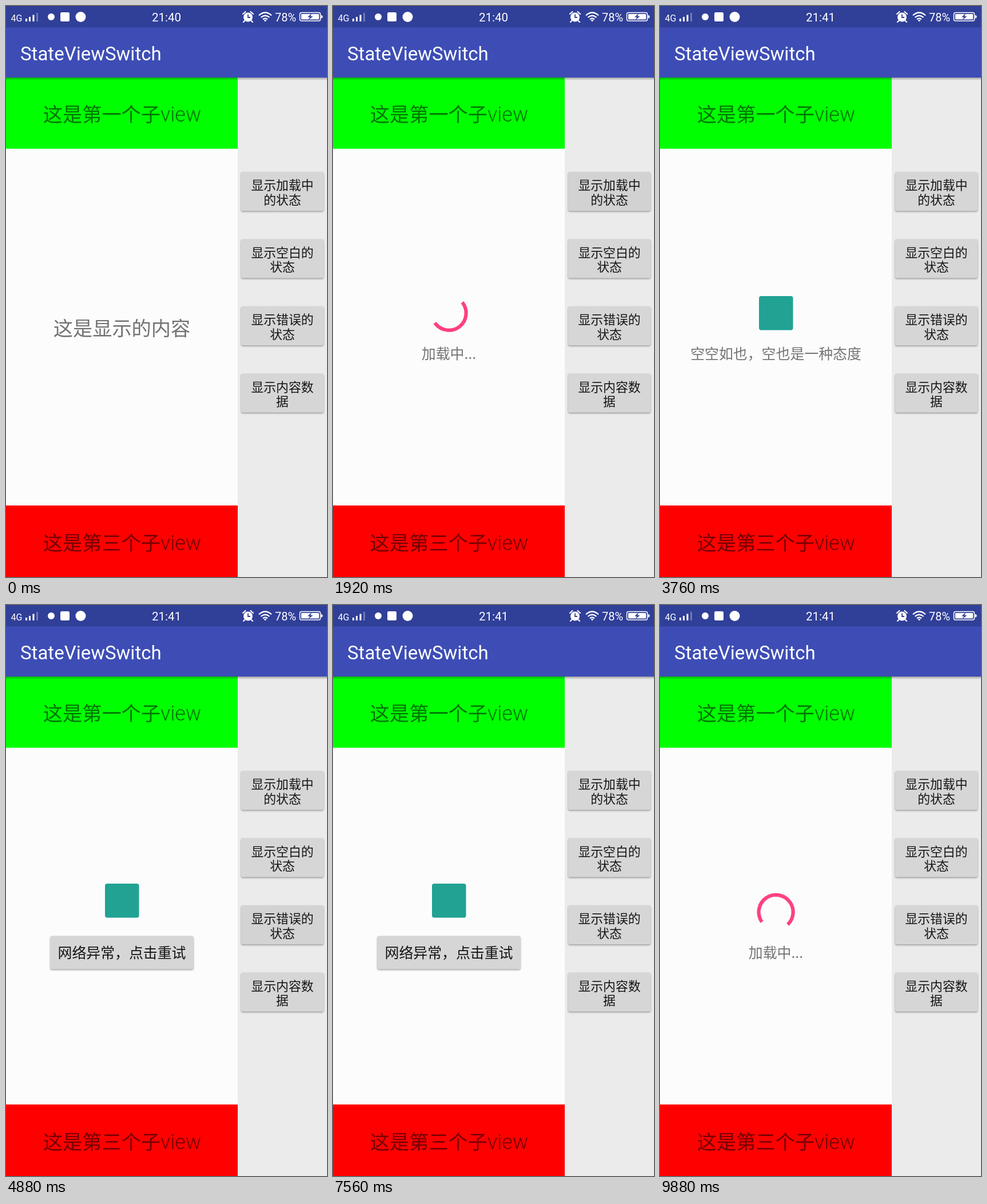
Recreate the animation shown at these times as an HTML page. Size 561 by 998 pixels, loop 9.92 s.

```html
<!DOCTYPE html>
<html lang="zh-CN">
<head>
<meta charset="utf-8">
<title>StateViewSwitch</title>
<style>
  html, body { margin: 0; width: 100%; height: 100%; overflow: hidden; background: #fcfcfd; }
  svg { display: block; width: 561px; height: 998px; }
  text { font-family: "Noto Sans CJK SC", "Noto Sans CJK", "Noto Sans SC", sans-serif; }
  .latin { font-family: Roboto, "Noto Sans", sans-serif; }
  .mid { text-anchor: middle; }
  .big { font-size: 34.2px; font-weight: 350; fill: #000; fill-opacity: .55; }
  .big .latin { font-size: 36px; font-weight: 300; }
  .note { font-size: 24.9px; font-weight: 350; fill: #747474; }
  .label { fill: #141414; }
  .bar { fill: #fff; }
</style>
</head>
<body>
<svg viewBox="0 0 561 998">
  <defs>
    <linearGradient id="fade" x2="0" y2="1">
      <stop offset="0" stop-opacity=".32"/>
      <stop offset="1" stop-opacity="0"/>
    </linearGradient>
    <filter id="soft" x="-10%" y="-20%" width="120%" height="140%">
      <feGaussianBlur stdDeviation="1.5"/>
    </filter>
  </defs>

  <rect width="561" height="998" fill="#fcfcfd"/>
  <rect x="405" y="125" width="156" height="873" fill="#eaebea"/>
  <rect y="125" width="405" height="124.5" fill="#0f0"/>
  <rect y="873" width="405" height="125" fill="#f00"/>
  <text class="big mid" x="203" y="202">这是第一个子<tspan class="latin">view</tspan></text>
  <text class="big mid" x="203" y="951">这是第三个子<tspan class="latin">view</tspan></text>

  <!-- app bar and status bar -->
  <rect y="125" width="561" height="5" fill="url(#fade)"/>
  <rect y="37" width="561" height="88" fill="#3d4db5"/>
  <rect width="561" height="37.5" fill="#303f98"/>
  <text class="latin bar" x="25" y="94.5" font-size="33">StateViewSwitch</text>

  <g class="bar">
    <text class="latin" x="8.500" y="27" font-size="16">4G</text>
    <path d="M34 22h3v5h-3zM40 19h3v8h-3zM46.500 15.500h3v11.500h-3z"/>
    <path d="M53 12h3v15h-3z" opacity=".3"/>
    <circle cx="79" cy="19" r="6"/>
    <rect x="95" y="11" width="16" height="16" rx="2.500"/>
    <circle cx="130.500" cy="19" r="9"/>
    <text id="clock" class="latin mid" x="280.500" y="27" font-size="20.5">21:40</text>

    <circle cx="423" cy="19.500" r="8"/>
    <path d="M414 14l4.500-4M427.500 10l4.500 4M417 26l-2 2M429 26l2 2" stroke="#fff" stroke-width="2.200" stroke-linecap="round"/>
    <path d="M423 14.500v5.500h4" fill="none" stroke="#303f98" stroke-width="1.800"/>

    <g fill="none" stroke="#fff" stroke-width="2.300">
      <path d="M442 16.500q11-10 22 0M445.500 20q7.500-6.500 15 0M449 23.300q4-3.400 8 0"/>
    </g>
    <path d="M450.500 24.800q2.500-1.800 5 0l-2.500 2.700z"/>
    <text class="latin" x="470" y="26.500" font-size="20">78%</text>

    <rect x="513.500" y="11.500" width="36" height="14.500" rx="3" fill="none" stroke="#fff" stroke-width="1.500"/>
    <rect x="516" y="14" width="31" height="9.500" rx="1"/>
    <path d="M550.500 16q3 0 3 2.800t-3 2.800z"/>
    <path d="M534 13l-7 6.500h4l-2.500 5 8-6.500h-4.200z" fill="#303f98"/>
  </g>

  <g id="content">
    <text class="big mid" x="202.500" y="576">这是显示的内容</text>
  </g>
  <g id="loading">
    <circle id="arc" cx="202.600" cy="536.700" r="30" fill="none" stroke="#ff4081" stroke-width="6.200" pathLength="360"/>
    <text class="note mid" x="202.500" y="617">加载中...</text>
  </g>
  <g id="empty">
    <rect x="173" y="507" width="59.500" height="59.500" rx="4" fill="#21a293"/>
    <text class="note mid" x="202.500" y="617">空空如也，空也是一种态度</text>
  </g>
  <g id="error">
    <rect x="173" y="487" width="59.500" height="59.500" rx="4" fill="#21a293"/>
  </g>
  <g id="side"></g>
</svg>

<script>
const LOOP = 9920;
const CLOCK_TICK = 3720;
const CLICK_DELAY = 160;   // touch down to state change
const SPIN_DELAY = 30;     // state change to first arc

const $ = id => document.getElementById(id);
const clamp = v => Math.min(1, Math.max(0, v));

const views = ['content', 'loading', 'empty', 'error'];
const taps = [
  { at: 1440, button: 0, view: 'loading' },
  { at: 2840, button: 1, view: 'empty' },
  { at: 4360, button: 2, view: 'error' },
  { at: 5640, button: 3, view: 'content' },
  { at: 6600, button: 2, view: 'error' },
  { at: 7840, button: 4, view: 'loading' }
];

const buttons = [];

function addButton(parent, x, y, w, h, size, lines) {
  const id = 'clip' + buttons.length;
  const box = `x="${x}" y="${y}" width="${w}" height="${h}" rx="3"`;
  const cx = x + w / 2, cy = y + h / 2;
  const text = lines.map(([line, base]) =>
    `<text class="label mid" x="${cx}" y="${base}" font-size="${size}">${line}</text>`).join('');
  const g = document.createElementNS('http://www.w3.org/2000/svg', 'g');
  g.innerHTML = `
    <clipPath id="${id}"><rect ${box}/></clipPath>
    <rect ${box} filter="url(#soft)" opacity=".36" transform="translate(0 1.5)"/>
    <rect ${box} class="lift" filter="url(#soft)" transform="translate(0 3)"/>
    <rect ${box} fill="#d5d6d5"/>
    <g clip-path="url(#${id})"><circle class="ripple" cx="${cx}" cy="${cy}"/></g>
    ${text}`;
  parent.append(g);
  buttons.push({
    lift: g.querySelector('.lift'),
    ripple: g.querySelector('.ripple'),
    reach: Math.hypot(w, h) / 2
  });
}

[['显示加载中', '的状态'], ['显示空白的', '状态'], ['显示错误的', '状态'], ['显示内容数', '据']]
  .forEach(([a, b], i) => {
    const y = 290 + i * 117.5;
    addButton($('side'), 411, y, 144, 68, 21.8, [[a, y + 31], [b, y + 56.5]]);
  });
addButton($('error'), 77.5, 578.5, 250, 58, 24.9, [['网络异常，点击重试', 617]]);

// cubic-bezier(.4, 0, .2, 1)
function ease(x) {
  if (x <= 0 || x >= 1) return clamp(x);
  let lo = 0, hi = 1, s;
  for (let i = 0; i < 24; i++) {
    s = (lo + hi) / 2;
    const r = 1 - s;
    if (1.2 * r * r * s + 0.6 * r * s * s + s * s * s < x) lo = s; else hi = s;
  }
  return s * s * (3 - 2 * s);
}

function drawArc(age) {
  const arc = $('arc');
  arc.style.visibility = age > 0 ? 'inherit' : 'hidden';
  if (age <= 0) return;
  const p = age % 1333 / 1333;
  const start = 270 * ease(2 * p - 1);
  const sweep = 270 * ease(2 * p) - start;
  const turn = -90 + 90 * p + start + age * 720 / 6665;
  arc.setAttribute('stroke-dasharray', `${Math.max(sweep, 0.5)} 360`);
  arc.setAttribute('transform', `rotate(${turn} 202.6 536.7)`);
}

function drawPress(button, age) {
  const on = age >= 0 && age < 600;
  const lift = on ? Math.min(clamp(age / 100), clamp((400 - age) / 150)) : 0;
  const tint = on ? Math.min(clamp((age + 40) / 120), clamp((600 - age) / 380)) : 0;
  button.lift.setAttribute('opacity', 0.22 * lift);
  button.ripple.setAttribute('opacity', 0.06 * tint);
  button.ripple.setAttribute('r', button.reach * (0.3 + 0.7 * clamp(age / 260)));
}

function draw(t) {
  let view = 'content', since = 0;
  const ages = buttons.map(() => -1);
  for (const tap of taps) {
    if (t >= tap.at) ages[tap.button] = t - tap.at;
    if (t >= tap.at + CLICK_DELAY) {
      view = tap.view;
      since = tap.at + CLICK_DELAY;
    }
  }
  for (const id of views) $(id).style.visibility = id === view ? 'visible' : 'hidden';
  $('clock').textContent = t < CLOCK_TICK ? '21:40' : '21:41';
  buttons.forEach((b, i) => drawPress(b, ages[i]));
  drawArc(view === 'loading' ? t - since - SPIN_DELAY : 0);
}

const began = performance.now();
function tick() {
  draw((performance.now() - began) % LOOP);
  requestAnimationFrame(tick);
}
tick();
</script>
</body>
</html>
```
